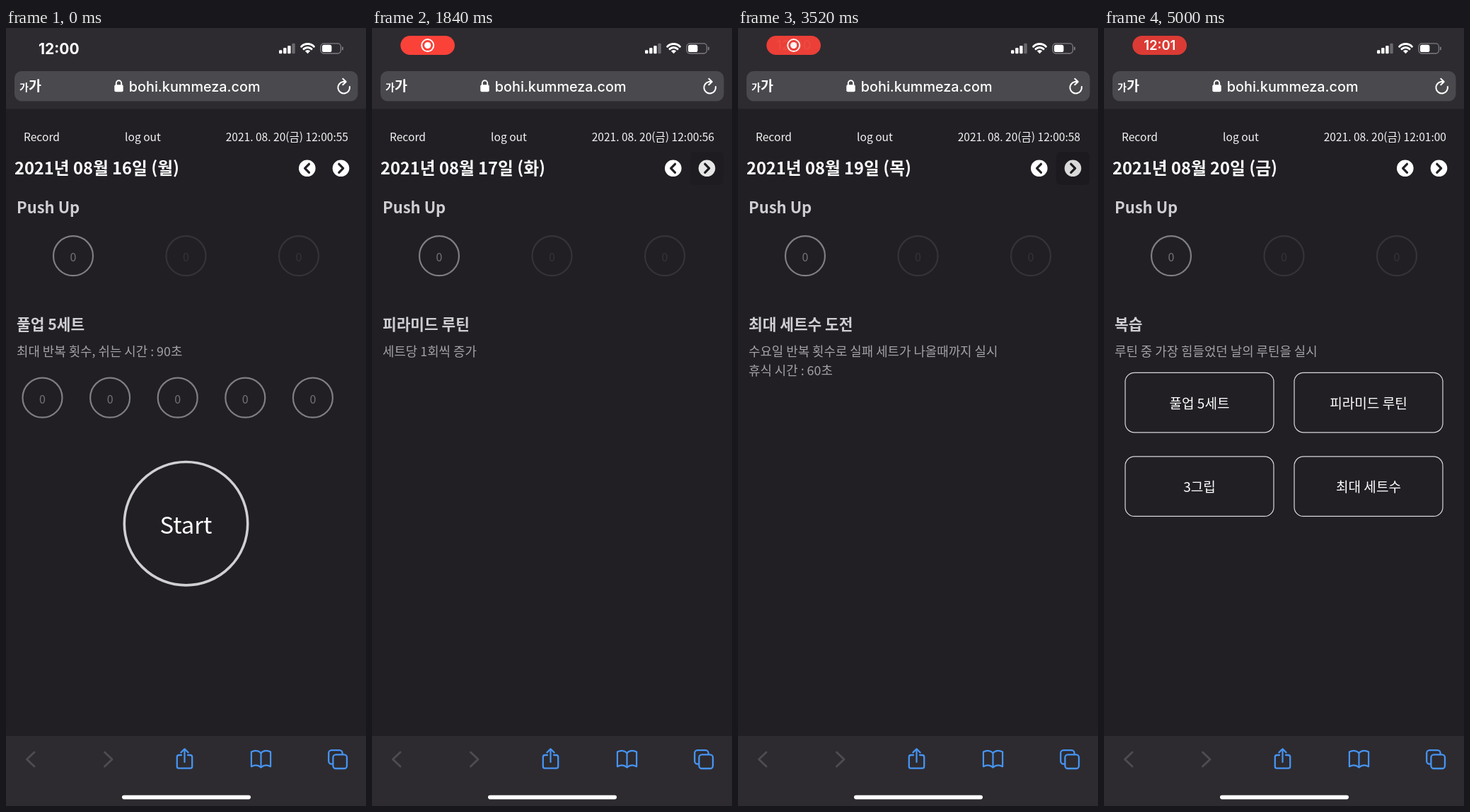
An HTML page with a canvas that plays this animation: 509 by 1100 pixels, repeating every 5040 ms.

```html
<!DOCTYPE html>
<html lang="ko">
<head>
<meta charset="utf-8">
<title>Workout log</title>
<style>
html, body { margin: 0; width: 100%; height: 100%; overflow: hidden; background: #211f24; }
canvas { display: block; width: 509px; height: 1100px; }
</style>
</head>
<body>
<canvas id="stage"></canvas>
<script>
const W = 509, H = 1100, LOOP = 5040;
const KR = '"Noto Sans CJK KR", "Noto Sans CJK JP", "Noto Sans CJK", sans-serif';
const UI = 'Inter, "Liberation Sans", sans-serif';
const PAGE = '#211f24', BAR = '#2d2b30', BLUE = '#4794f2', SOFT = '#cfced1', MUTED = '#a3a2a5';
const RING = '#7f7e82', DIM = '#353338';

const FIRST_CHANGE = 1800, STEP = 860;
const FIRST_TICK = 900;

const canvas = document.getElementById('stage');
const ratio = window.devicePixelRatio || 1;
canvas.width = W * ratio;
canvas.height = H * ratio;
const ctx = canvas.getContext('2d');

const clamp = v => Math.max(0, Math.min(1, v));
const ramp = (t, from, to) => clamp((t - from) / (to - from));
const smooth = v => v * v * (3 - 2 * v);

function text(str, x, y, size, color = '#fff', { weight = 400, align = 'left', font = KR } = {}) {
  ctx.font = `${weight} ${size}px ${font}`;
  ctx.textAlign = align;
  ctx.fillStyle = color;
  ctx.fillText(str, x, y);
}

function box(x, y, w, h, r) {
  ctx.beginPath();
  ctx.roundRect(x, y, w, h, r);
}

function fillBox(x, y, w, h, r, color) {
  box(x, y, w, h, r);
  ctx.fillStyle = color;
  ctx.fill();
}

function disc(x, y, r, color) {
  ctx.beginPath();
  ctx.arc(x, y, r, 0, Math.PI * 2);
  ctx.fillStyle = color;
  ctx.fill();
}

function stroke(color, width) {
  ctx.strokeStyle = color;
  ctx.lineWidth = width;
  ctx.stroke();
}

function ring(x, y, r, color, width) {
  ctx.beginPath();
  ctx.arc(x, y, r, 0, Math.PI * 2);
  stroke(color, width);
}

function line(points, color, width) {
  ctx.beginPath();
  points.forEach(([x, y]) => ctx.lineTo(x, y));
  stroke(color, width);
}

function withAlpha(alpha, draw) {
  if (alpha <= 0) return;
  ctx.save();
  ctx.globalAlpha *= alpha;
  draw();
  ctx.restore();
}

function counter(x, y, color = RING) {
  ring(x, y, 28, color, 2.2);
  text('0', x, y + 7.8, 16, color === RING ? '#747377' : color, { align: 'center' });
}

function heading(title, ...notes) {
  text(title, 15, 427, 21.4, SOFT, { weight: 700 });
  notes.forEach((note, i) => text(note, 15, 463.7 + i * 27.6, 17.85, MUTED));
}

function startButton(y) {
  ring(254.5, y, 87.2, '#d0cfd2', 3.6);
  text('Start', 254.5, y + 14.4, 32.8, '#fff', { align: 'center' });
}

function option(label, x, y) {
  box(x, y, 210, 84.5, 13);
  stroke('#d8d7da', 1.2);
  text(label, x + 105, y + 50.5, 19.1, '#fff', { align: 'center' });
}

const days = [
  {
    date: '16일 (월)', start: 700.7,
    draw() {
      heading('풀업 5세트', '최대 반복 횟수, 쉬는 시간 : 90초');
      for (let i = 0; i < 5; i++) counter(51.5 + i * 95.6, 522.7);
    }
  },
  {
    date: '17일 (화)', start: 618.7,
    draw() { heading('피라미드 루틴', '세트당 1회씩 증가'); }
  },
  {
    date: '18일 (수)', start: 884,
    draw() {
      heading('3그립', '풀업, 친업, 와이드 풀업을 각 3세트, 쉬는 시간 : 60초');
      ['Pull Up', 'Chin Up', 'Wide Pull Up'].forEach((name, row) => {
        const y = 513.6 + row * 96.4;
        text(name, 15, y + 8.8, 19.4, SOFT, { weight: 700 });
        for (let i = 0; i < 3; i++) counter(235.7 + i * 107.2, y);
      });
    }
  },
  {
    date: '19일 (목)', start: 646,
    draw() {
      heading('최대 세트수 도전', '수요일 반복 횟수로 실패 세트가 나올때까지 실시', '휴식 시간 : 60초');
    }
  },
  {
    date: '20일 (금)',
    draw() {
      heading('복습', '루틴 중 가장 힘들었던 날의 루틴을 실시');
      ['풀업 5세트', '피라미드 루틴', '3그립', '최대 세트수'].forEach((name, i) =>
        option(name, 30 + (i % 2) * 239, 487.3 + (i >> 1) * 118.6));
    }
  }
];

function statusIcons() {
  for (let i = 0; i < 4; i++) {
    const h = 5 + i * 3.2;
    fillBox(386 + i * 6.1, 36.3 - h, 4.4, h, 1.2, i < 3 ? '#fff' : '#69686c');
  }
  // wifi fan
  const up = -Math.PI / 2, spread = 0.78;
  [12.6, 7.8].forEach(r => {
    ctx.beginPath();
    ctx.arc(426.5, 35.2, r, up - spread, up + spread);
    stroke('#fff', 3);
  });
  ctx.beginPath();
  ctx.moveTo(426.5, 36.2);
  ctx.arc(426.5, 36.2, 5.2, up - spread, up + spread);
  ctx.closePath();
  ctx.fillStyle = '#fff';
  ctx.fill();
  // battery
  box(445, 21.8, 28.4, 14.2, 4.4);
  stroke('#7f7e82', 1.3);
  fillBox(447, 23.8, 13.4, 10.2, 2.6, '#fff');
  fillBox(475, 26.6, 1.8, 4.8, 1, '#7f7e82');
}

function statusTime(t) {
  const label = t < FIRST_TICK + 4000 ? '12:00' : '12:01';
  const shown = smooth(ramp(t, 40, 360));
  withAlpha(1 - shown, () =>
    text(label, 74.8, 36.5, 21, '#fff', { weight: 700, align: 'center', font: UI }));
  withAlpha(shown, () => {
    const glow = clamp(0.5 - 0.56 * Math.cos((t - 1120) / 1940 * Math.PI * 2));
    const mix = (a, b) => Math.round(a + (b - a) * glow);
    fillBox(40.3, 11, 76.7, 27, 13.5, `rgb(${mix(219, 255)},${mix(59, 67)},${mix(52, 58)})`);
    const swap = smooth(ramp(t, 3480, 3760));
    withAlpha(1 - swap, () => {
      ring(78.7, 24.6, 8.5, '#fff', 2);
      disc(78.7, 24.6, 4.6, '#fff');
    });
    withAlpha(swap, () =>
      text(label, 78.8, 31.1, 18.5, '#fff', { weight: 600, align: 'center', font: UI }));
  });
}

function addressBar() {
  fillBox(12, 61, 485.5, 42.5, 10, '#4a494d');
  text('가', 19, 88.5, 14, '#fff', { weight: 700 });
  text('가', 32, 88.5, 19.5, '#fff', { weight: 700 });
  // padlock
  fillBox(153.3, 80.2, 12.4, 10, 2, '#fff');
  ctx.beginPath();
  ctx.moveTo(155.8, 81);
  ctx.lineTo(155.8, 78);
  ctx.arc(159.5, 78, 3.7, Math.PI, 0);
  ctx.lineTo(163.2, 81);
  stroke('#fff', 1.9);
  text('bohi.kummeza.com', 173.8, 89.6, 19.8, '#fff', { weight: 500, font: UI });
  // reload
  ctx.beginPath();
  ctx.arc(477.7, 84.2, 8.3, -0.15, Math.PI * 1.5 + 0.1);
  stroke('#fff', 2.1);
  line([[476.3, 71.8], [480.7, 76], [476.3, 80.2]], '#fff', 2.1);
}

function toolbar() {
  ctx.fillStyle = BAR;
  ctx.fillRect(0, 1001, W, 99);
  line([[40, 1024], [29.5, 1034], [40, 1044]], '#4d4c50', 3);
  line([[139.5, 1024], [150, 1034], [139.5, 1044]], '#4d4c50', 3);
  // share
  ctx.beginPath();
  ctx.moveTo(248, 1028);
  ctx.lineTo(244.5, 1028);
  ctx.arcTo(241.8, 1028, 241.8, 1031, 2.7);
  ctx.arcTo(241.8, 1046.6, 245, 1046.6, 2.7);
  ctx.arcTo(263.2, 1046.6, 263.2, 1043, 2.7);
  ctx.arcTo(263.2, 1028, 260, 1028, 2.7);
  ctx.lineTo(257, 1028);
  stroke(BLUE, 2.3);
  line([[252.5, 1038], [252.5, 1020]], BLUE, 2.2);
  line([[247.4, 1024.4], [252.5, 1019.3], [257.6, 1024.4]], BLUE, 2.2);
  // open book
  [-1, 1].forEach(side => {
    const x = d => 360.5 + side * d;
    ctx.beginPath();
    ctx.moveTo(360.5, 1025);
    ctx.bezierCurveTo(x(4), 1020.8, x(10), 1021.2, x(13.6), 1023.5);
    ctx.lineTo(x(13.6), 1044.2);
    ctx.bezierCurveTo(x(9), 1041.5, x(4), 1041.8, 360.5, 1045.3);
    stroke(BLUE, 2.2);
  });
  line([[360.5, 1025], [360.5, 1045]], BLUE, 2.2);
  // tabs
  box(456.2, 1021.2, 19.4, 19.4, 4);
  stroke(BLUE, 2.3);
  box(462.4, 1027.4, 19.6, 19.6, 4);
  ctx.fillStyle = BAR;
  ctx.fill();
  stroke(BLUE, 2.3);
  fillBox(164, 1084.8, 182, 5.6, 2.8, '#fff');
}

function navArrow(x, dir) {
  disc(x, 198.3, 11.8, '#fff');
  line([[x - dir * 2.7, 192.3], [x + dir * 3.2, 198.3], [x - dir * 2.7, 204.3]], PAGE, 3.2);
}

function tapShade(t) {
  for (let i = 0; i < 4; i++) {
    const hit = FIRST_CHANGE + i * STEP;
    const alpha = 0.15 * ramp(t, hit - 160, hit - 100) * (1 - ramp(t, hit, hit + 120));
    if (alpha > 0) fillBox(450, 175, 47, 47, 6, `rgba(0,0,0,${alpha})`);
  }
}

function pageTop(t, day) {
  const sec = 55 + (t < FIRST_TICK ? 0 : 1 + Math.floor((t - FIRST_TICK) / 1000));
  const clock = sec < 60 ? `12:00:${sec}` : '12:01:00';
  text('Record', 25, 159.8, 15.6, '#f4f4f4');
  text('log out', 168, 159.8, 15.6, '#f4f4f4');
  text(`2021. 08. 20(금) ${clock}`, 484, 159.8, 15.55, '#f4f4f4', { align: 'right' });
  text(`2021년 08월 ${day.date}`, 11.9, 206.8, 23.7, '#fff', { weight: 700 });
  navArrow(425.8, -1);
  navArrow(473.5, 1);
  tapShade(t);
  text('Push Up', 15, 262.3, 22, SOFT, { weight: 700 });
  counter(95, 322.2);
  counter(254.5, 322.2, DIM);
  counter(414, 322.2, DIM);
}

function render(t) {
  ctx.setTransform(ratio, 0, 0, ratio, 0, 0);
  ctx.textBaseline = 'alphabetic';
  ctx.lineCap = ctx.lineJoin = 'round';
  ctx.fillStyle = PAGE;
  ctx.fillRect(0, 0, W, H);
  ctx.fillStyle = BAR;
  ctx.fillRect(0, 0, W, 114.5);

  const index = t < FIRST_CHANGE ? 0 : Math.min(4, 1 + Math.floor((t - FIRST_CHANGE) / STEP));
  const day = days[index];
  const since = t - FIRST_CHANGE - (index - 1) * STEP;

  statusTime(t);
  statusIcons();
  addressBar();
  pageTop(t, day);
  day.draw();
  if (day.start) {
    withAlpha(index ? smooth(ramp(since, 50, 260)) : 1, () => startButton(day.start));
  }
  toolbar();
}

const begin = performance.now();
function tick() {
  render((performance.now() - begin) % LOOP);
  requestAnimationFrame(tick);
}
tick();
</script>
</body>
</html>
```
